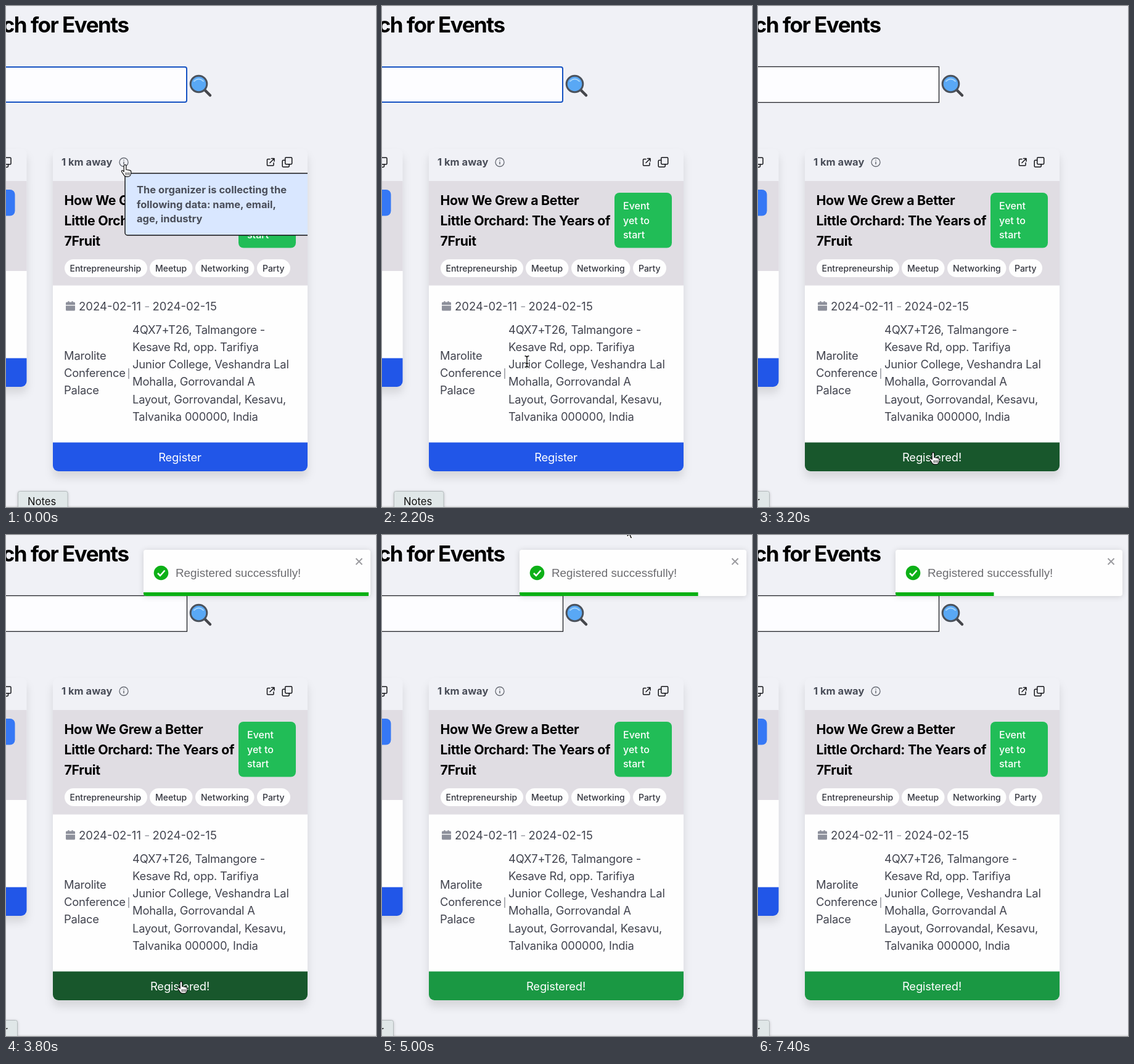
These frames come from a looping animation (600x813 px, 7600 ms). An HTML page:

```html
<!DOCTYPE html>
<html lang="en">
<head>
<meta charset="utf-8">
<title>Event registration</title>
<style>
  html, body { margin: 0; width: 100%; height: 100%; overflow: hidden; background: #f0f1f6; }
  svg { display: block; width: 100vw; height: 100vh; }
  text { font-family: Inter, sans-serif; font-optical-sizing: none; white-space: pre; }

  .heading { font-size: 35px; font-weight: 700; letter-spacing: -1.5px; text-anchor: end; }
  .title { font-size: 21.3px; font-weight: 700; letter-spacing: -.3px; }
  .body { font-size: 18.4px; letter-spacing: -.2px; fill: #42444f; }
  .date { font-size: 18.5px; fill: #42444f; }
  .note { font-size: 16.5px; font-weight: 700; fill: #4a4e59; }
  .tags text { font-size: 14px; font-weight: 500; fill: #34363f; }
  .badge { font-size: 16px; font-weight: 500; fill: #fff; }
  .button { font-size: 18.4px; letter-spacing: -.2px; fill: #fff; text-anchor: middle; }
  .dock text { font-size: 16.6px; fill: #111; }
  .dock rect { fill: #e0e7e8; stroke: #b4bbbd; filter: drop-shadow(0 1px 2px #0003); }
  .card { filter: drop-shadow(0 10px 7px rgba(0, 0, 0, .11)); }
  .icon { fill: none; stroke: #15161a; stroke-width: 1.5; stroke-linecap: round; stroke-linejoin: round; }
  .toast-box { filter: drop-shadow(0 1px 5px rgba(0, 0, 0, .14)); }
  .toast text { font: 18.86px "Liberation Sans", Arial, sans-serif; fill: #6c6c70; }

  /* One 7.6 s timeline; every change lands on a 200 ms tick. */
  .live { animation: 7.6s step-end infinite; }
  .tooltip { animation-name: tooltip; }
  .before-dock { animation-name: before-dock; }
  .after-dock { animation-name: after-dock; }
  .focused { animation-name: focused; }
  .blurred { animation-name: blurred; }
  .action { animation-name: action; }
  .register { animation-name: register; }
  .registered { animation-name: registered; }
  .toast { animation-name: toast; }
  .progress { animation-name: progress; transform-origin: 223px 0; }
  .cursor { animation-name: cursor; }
  .hand { animation-name: hand; }
  .beam { animation-name: beam; }
  .arrow { animation-name: arrow; }

  @keyframes tooltip { 0% { visibility: visible } 23.684%, 100% { visibility: hidden } }
  @keyframes before-dock { 0% { visibility: visible } 31.578%, 100% { visibility: hidden } }
  @keyframes after-dock { 0% { visibility: hidden } 31.578%, 100% { visibility: visible } }
  @keyframes focused { 0% { visibility: visible } 36.842%, 100% { visibility: hidden } }
  @keyframes blurred { 0% { visibility: hidden } 36.842%, 100% { visibility: visible } }
  @keyframes register { 0% { visibility: visible } 42.105%, 100% { visibility: hidden } }
  @keyframes registered { 0% { visibility: hidden } 42.105%, 100% { visibility: visible } }
  @keyframes action {
    0% { fill: #2156e8 }
    34.21% { fill: #1e40af }
    42.105% { fill: #18572c }
    55.263%, 100% { fill: #1a9843 }
  }
  @keyframes toast {
    0% { visibility: hidden; transform: translateX(380px) }
    44.736% { visibility: visible; transform: translateX(-12px) }
    47.368% { visibility: visible; transform: translateX(8px) }
    50%, 100% { visibility: visible; transform: none }
  }
  @keyframes progress {
    0% { transform: none }
    50% { transform: scaleX(.992); animation-timing-function: steps(6) }
    65.789% { transform: scaleX(.787); animation-timing-function: steps(12) }
    97.368%, 100% { transform: scaleX(.4334) }
  }
  @keyframes cursor {
    0% { transform: translate(193px, 258px) }
    7.894% { transform: translate(193px, 254px) }
    23.684% { transform: translate(203px, 330px) }
    26.315% { transform: translate(222px, 480px) }
    28.947% { transform: translate(235px, 577px) }
    31.578% { transform: translate(268px, 690px) }
    34.21% { transform: translate(284px, 725px) }
    55.263% { transform: translate(295px, 690px) }
    57.894% { transform: translate(318px, 540px) }
    60.526% { transform: translate(350px, 330px) }
    63.157% { transform: translate(382px, 110px) }
    65.789%, 100% { transform: translate(397px, -12px) }
  }
  @keyframes hand {
    0% { visibility: visible }
    23.684% { visibility: hidden }
    34.21% { visibility: visible }
    55.263%, 100% { visibility: hidden }
  }
  @keyframes beam {
    0% { visibility: hidden }
    23.684% { visibility: visible }
    34.21%, 100% { visibility: hidden }
  }
  @keyframes arrow {
    0% { visibility: hidden }
    55.263% { visibility: visible }
    68.421%, 100% { visibility: hidden }
  }
</style>
</head>
<body>
<svg viewBox="0 0 600 813">
  <defs>
    <clipPath id="card-clip"><rect x="76" y="232" width="413" height="523" rx="9"/></clipPath>
    <clipPath id="toast-clip"><rect x="223" y="24" width="368" height="75" rx="4"/></clipPath>
    <g id="copy" class="icon">
      <rect x="5" y="0" width="11" height="11" rx="1.5"/>
      <path d="M5 4.5H2A1.5 1.5 0 0 0 .5 6v8A1.5 1.5 0 0 0 2 15.5h8a1.5 1.5 0 0 0 1.5-1.5v-3"/>
    </g>
    <path id="caret" d="M-3-9q3 0 3 2.5V6.5Q0 9-3 9M3-9q-3 0-3 2.5M0 6.5Q0 9 3 9M-2 3h4"/>
  </defs>

  <rect width="600" height="813" fill="#f0f1f6"/>
  <rect y="811" width="600" height="2" fill="#e5e6e8"/>

  <text class="heading" x="198.5" y="42.5">Search for Events</text>

  <!-- search field -->
  <g fill="#fdfdff">
    <rect class="live focused" x="-20" y="99" width="313" height="57" rx="3" stroke="#1552c2" stroke-width="2"/>
    <rect class="live blurred" x="-20" y="98.5" width="313.5" height="58" stroke="#202126" stroke-width="1.3"/>
  </g>
  <g fill="none" stroke-linecap="round">
    <path d="M323 137l8 8" stroke="#45464b" stroke-width="4.5"/>
    <circle cx="312.5" cy="126.5" r="13.3" fill="#59a8f5" stroke="#4b525c" stroke-width="3"/>
    <path d="M305 122q7.5-7 15 0" stroke="#a4d4fb" stroke-width="2"/>
  </g>

  <!-- neighbouring card -->
  <g class="card">
    <rect x="-60" y="232" width="93.5" height="386" rx="9" fill="#f0f1f6"/>
    <rect x="-60" y="284" width="93.5" height="146" fill="#e0dde3"/>
    <rect x="-60" y="430" width="93.5" height="142" fill="#fefefe"/>
    <path d="M-60 571.5H33.5V609a9 9 0 0 1-9 9H-60Z" fill="#2156e8"/>
  </g>
  <rect x="-40" y="298" width="54.5" height="42.5" rx="8" fill="#3678f5"/>
  <use href="#copy" x="-8" y="246"/>

  <!-- event card -->
  <g class="card">
    <g clip-path="url(#card-clip)">
      <rect x="76" y="232" width="413" height="523" fill="#f0f1f6"/>
      <rect x="76" y="284" width="413" height="170" fill="#e0dde3"/>
      <rect x="76" y="453.5" width="413" height="255" fill="#fefefe"/>
      <rect class="live action" x="76" y="708.3" width="413" height="47"/>
    </g>
  </g>

  <text class="note" x="90" y="259">1 km away</text>
  <circle cx="191" cy="253.5" r="7" fill="none" stroke="#666a73" stroke-width="1.3"/>
  <path d="M191 252.5v4.5M191 249.5v1.3" stroke="#666a73" stroke-width="1.5"/>
  <path class="icon" d="M428 248.5h-3.5a1 1 0 0 0-1 1V258a1 1 0 0 0 1 1h8.5a1 1 0 0 0 1-1v-3.5M430.5 247.5h4.5v4.5M435 247.5l-7 7"/>
  <use href="#copy" x="447.7" y="245.7"/>

  <text class="title" y="322.5">
    <tspan x="94.5">How We Grew a Better</tspan>
    <tspan x="94.5" dy="33">Little Orchard: The Years of</tspan>
    <tspan x="94.5" dy="33">7Fruit</tspan>
  </text>
  <rect x="377" y="303" width="93" height="89.5" rx="8" fill="#21bd57"/>
  <text class="badge" y="330">
    <tspan x="391">Event</tspan>
    <tspan x="391" dy="23.6">yet to</tspan>
    <tspan x="391" dy="23.6">start</tspan>
  </text>

  <g class="tags">
    <g fill="#fefefe">
      <rect x="95" y="411" width="134" height="29" rx="14.5"/>
      <rect x="233" y="411" width="69.5" height="29" rx="14.5"/>
      <rect x="307" y="411" width="95.5" height="29" rx="14.5"/>
      <rect x="407" y="411" width="54" height="29" rx="14.5"/>
    </g>
    <text x="103.5" y="431">Entrepreneurship</text>
    <text x="242" y="431">Meetup</text>
    <text x="316" y="431">Networking</text>
    <text x="416" y="431">Party</text>
  </g>

  <path d="M97 485v-3a1.5 1.5 0 0 1 1.5-1.5h2V479h2v1.5h4V479h2v1.5h2a1.5 1.5 0 0 1 1.5 1.5v3ZM97 486.2h15v6.8a1.5 1.5 0 0 1-1.5 1.5h-12a1.5 1.5 0 0 1-1.5-1.5Z" fill="#8d909b"/>
  <text class="date" x="118" y="493.7">2024-02-11</text>
  <path d="M225.5 488h6.5" stroke="#9a9ca5" stroke-width="1.5"/>
  <text class="date" x="237.5" y="493.7">2024-02-15</text>

  <text class="body" y="573.8">
    <tspan x="94">Marolite</tspan>
    <tspan x="94" dy="28.3">Conference</tspan>
    <tspan x="94" dy="28.3">Palace</tspan>
  </text>
  <path d="M199 588v17" stroke="#8b8d96" stroke-width="1.4"/>
  <text class="body" y="531.5">
    <tspan x="205">4QX7+T26, Talmangore -</tspan>
    <tspan x="205" dy="28.3">Kesave Rd, opp. Tarifiya</tspan>
    <tspan x="205" dy="28.3">Junior College, Veshandra Lal</tspan>
    <tspan x="205" dy="28.3">Mohalla, Gorrovandal A</tspan>
    <tspan x="205" dy="28.3">Layout, Gorrovandal, Kesavu,</tspan>
    <tspan x="205" dy="28.3">Talvanika 000000, India</tspan>
  </text>

  <text class="button live register" x="282" y="739">Register</text>
  <text class="button live registered" x="282" y="739">Registered!</text>

  <g class="live tooltip">
    <path d="M489 271.5H197a4 4 0 0 0-4 4V368a4 4 0 0 0 4 4H489" fill="#d9e7ff" stroke="#111" stroke-width="1.4"/>
    <text class="note" y="304">
      <tspan x="212">The organizer is collecting the</tspan>
      <tspan x="212" dy="23.6">following data: name, email,</tspan>
      <tspan x="212" dy="23.6">age, industry</tspan>
    </text>
  </g>

  <g class="dock">
    <g class="live before-dock">
      <rect x="19.5" y="787.5" width="80.5" height="40" rx="3"/>
      <text x="35" y="810">Notes</text>
    </g>
    <g class="live after-dock">
      <rect x="-60" y="787.5" width="78.5" height="40" rx="3"/>
      <text x="3" y="810" text-anchor="end">r</text>
    </g>
  </g>

  <g class="live toast">
    <rect class="toast-box" x="223" y="24" width="368" height="75" rx="4" fill="#fefefe"/>
    <circle cx="251.5" cy="61.5" r="11.8" fill="#0db017"/>
    <path d="M246 62l4 4 7.5-8.5" fill="none" stroke="#fff" stroke-width="2.5"/>
    <text x="275" y="68">Registered successfully!</text>
    <path d="M567.5 38l10 10m0-10l-10 10" stroke="#9b9b9f" stroke-width="2"/>
    <g clip-path="url(#toast-clip)">
      <rect class="live progress" x="223" y="93" width="368" height="6" fill="#09b013"/>
    </g>
  </g>

  <g class="live cursor" stroke-linejoin="round" stroke-linecap="round">
    <g class="live hand" fill="#fff" stroke="#111" stroke-width="1.2">
      <path d="M-1.8 1.5a1.8 1.8 0 0 1 3.6 0v6l6 1.2a2.5 2.5 0 0 1 2 2.6l-.8 4.2a4 4 0 0 1-4 3.3h-3a4 4 0 0 1-3.2-1.6l-4.2-6.2c-1-1.8 1-2.8 2.2-1.6l1.4 1.5z"/>
      <path d="M1.5 12.5v3.5M4 12.5v3.5M6.5 12.5v3.5" stroke-width="1"/>
    </g>
    <g class="live beam" fill="none">
      <use href="#caret" stroke="#fff" stroke-width="3"/>
      <use href="#caret" stroke="#111" stroke-width="1.4"/>
    </g>
    <path class="live arrow" d="M0 0V16L3.8 12.5 6.2 18 8.8 17 6.4 11.6 11.5 11.5Z" fill="#111" stroke="#fff" stroke-width="1.2"/>
  </g>
</svg>
</body>
</html>
```
